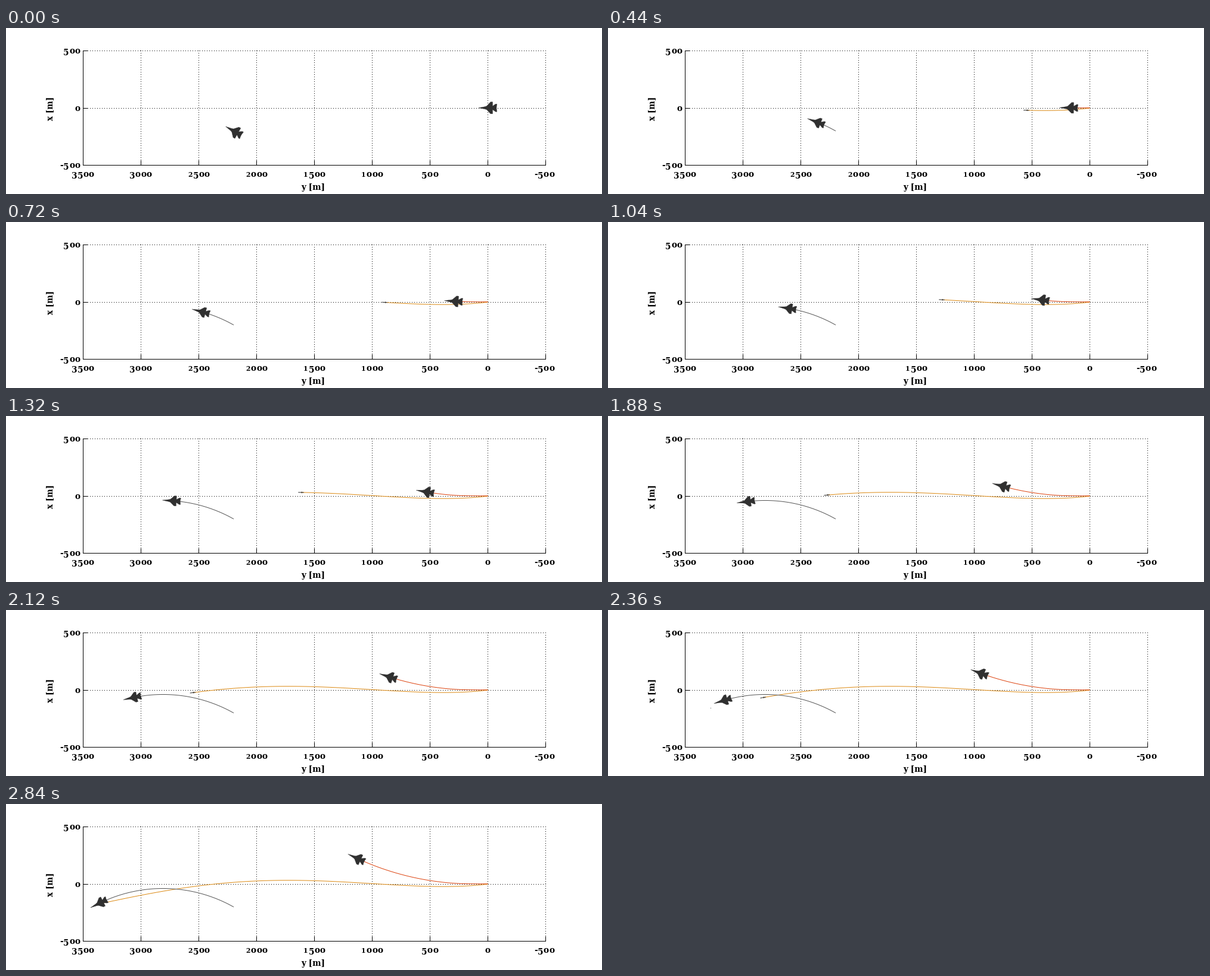
Animation, 1000 px wide and 280 px high, one loop 2880 ms. Source, as a matplotlib script:

```python
import numpy as np
import matplotlib.pyplot as plt
from matplotlib.animation import FuncAnimation
from matplotlib.patches import Polygon

W, H, DPI = 1000, 280, 80
PX = 72 / DPI                      # one pixel in points
FRAMES, INTERVAL = 72, 40
INK, GREY, RED, ORANGE = "#303030", "#555555", "#dd4410", "#dc8a14"

fig = plt.figure(figsize=(W / DPI, H / DPI), dpi=DPI, facecolor="white")
ax = fig.add_axes([0, 0, 1, 1])
ax.set_xlim(0, W)
ax.set_ylim(H, 0)
ax.axis("off")


# ---- chart ----
def line(x=(), y=(), color="black", **kw):
    kw = {"lw": PX, "snap": False, "solid_capstyle": "butt", **kw}
    return ax.plot(x, y, color=color, **kw)[0]


def dotted(x, y):
    line(x, y, ls=(0, (1, 3)), dash_capstyle="butt", zorder=1)


def label(x, y, s, size=13.6, **kw):
    ax.text(x, y, s, fontsize=size * PX, family="DejaVu Serif", weight="bold",
            ha="center", va="baseline", **kw)


def number(right, base, s, pitch=9.6):
    """Old-style figures: 0, 1, 2 at x-height, 3 and 5 below the baseline."""
    for i, c in enumerate(reversed(s)):
        x = right - pitch * (i + 0.5)
        if c == "0":
            label(x, base, "o")
        elif c in "12":
            label(x, base, c, 11)
        elif c == "-":
            label(x + 1.6, base, c)
        else:
            label(x, base + 3, c)


LEFT, RIGHT, TOP, MIDDLE, BOTTOM = 129.5, 905.5, 38.5, 135.5, 231.5

for i in range(9):
    x = LEFT + 97 * i
    value = str(3500 - 500 * i)
    if i:
        dotted([x, x], [TOP - 0.5, BOTTOM])
    line([x, x], [BOTTOM, BOTTOM - 8])
    shift = -4 if value[0] == "-" else -0.5
    number(x + shift + 4.8 * len(value), 251, value)

for y, value in ((TOP, "500"), (MIDDLE, "0"), (BOTTOM, "-500")):
    if y < BOTTOM:
        dotted([LEFT - 0.5, RIGHT], [y, y])
    line([LEFT, LEFT + 8.5], [y, y])
    number(125, y + 4.5, value)

line([LEFT, LEFT], [TOP - 0.5, BOTTOM + 0.5])
line([LEFT, RIGHT + 0.5], [BOTTOM, BOTTOM])
label(515, 272.8, "y [m]")
label(78, MIDDLE + 0.5, "x [m]", rotation=90, rotation_mode="anchor")

# ---- flight paths, headings in radians above the leftward direction ----
k = np.arange(FRAMES)


def fly(start, speed, heading):
    mid = (heading[1:] + heading[:-1]) / 2
    steps = speed * np.column_stack([np.cos(mid), np.sin(mid)])
    return start - np.vstack([(0, 0), steps.cumsum(axis=0)])


target_dir = np.radians(29.5 - 0.79 * k)
target = fly((382, 173.7), 3.32, target_dir)
hunter_dir = np.radians(0.4 * np.maximum(0, k - 8))
hunter = fly((808.5, 134.7), 3.2, hunter_dir)

# the missile slows a little and weaves along a smooth curve
KEYS = [(0, 0), (97, 3.7), (248, -3.8), (338, -6.8),
        (485, 3.2), (554, 13.3), (652, 33.3)]
weave = np.poly1d(np.polyfit(*np.transpose(KEYS), 5))
reach = 9.75 * k - 0.0078 * k ** 2
missile = np.column_stack([808.5 - reach, 135.2 + weave(reach)])
missile_dir = -np.arctan(weave.deriv()(reach))

# ---- aircraft: forward and sideways offsets in pixels ----
HALF = np.array([(15.5, 0), (5, 2), (2, 3), (-4.5, 10), (-8, 10),
                 (-8, 3), (-13, 6.5), (-15.3, 6.5), (-14.5, 1.5)])
BODY = np.vstack([HALF, HALF[::-1] * (1, -1)])
FIN = np.array([(-4, 1), (-11, 6.5), (-14.5, 6.5), (-14, 1)])


def place(shape, pos, angle, squash=1.0):
    c, s = np.cos(angle), np.sin(angle)
    return pos + np.multiply(shape, (1, squash)) @ [(-c, -s), (-s, c)]


def patch():
    return ax.add_patch(Polygon(np.zeros((3, 2)), fc=INK, ec=INK,
                                lw=0.3, zorder=5))


class Plane:
    def __init__(self, track, heading, bank, color):
        self.track, self.heading = track, heading
        self.bank = np.radians(bank) * np.clip(k / 10, 0, 1)
        self.trail = line(color=color, zorder=3)
        self.body, self.fin = patch(), patch()

    def show(self, n):
        self.trail.set_data(*self.track[:n + 1].T)
        pos, angle, bank = self.track[n], self.heading[n], self.bank[n]
        self.body.set_xy(place(BODY, pos, angle, np.cos(bank)))
        self.fin.set_xy(place(FIN, pos, angle, np.sin(bank)))


planes = [Plane(target, target_dir, 32, GREY),
          Plane(hunter, hunter_dir, -25, RED)]
smoke = line(color=ORANGE, zorder=2)
rocket = line(color=INK, zorder=4)
fins = line(color=INK, zorder=4)
speck = line(color=GREY, zorder=4)


def update(n):
    for plane in planes:
        plane.show(n)
    smoke.set_data(*missile[:n + 1].T)
    pose = missile[n], missile_dir[n]
    rocket.set_data(*place([(5, 0), (-4.5, 0)], *pose).T)
    fins.set_data(*place([(-1, 1.3), (-1, -1.3)], *pose).T)
    x, y = 172 - 3.18 * (n - 59), 165.5 + 0.8 * (n - 59)
    speck.set_data([x, x + 1], [y, y])
    speck.set_visible(57 <= n <= 70)
    return []


anim = FuncAnimation(fig, update, frames=FRAMES, interval=INTERVAL,
                     init_func=lambda: update(0), repeat=True, repeat_delay=0)
plt.show()
```
